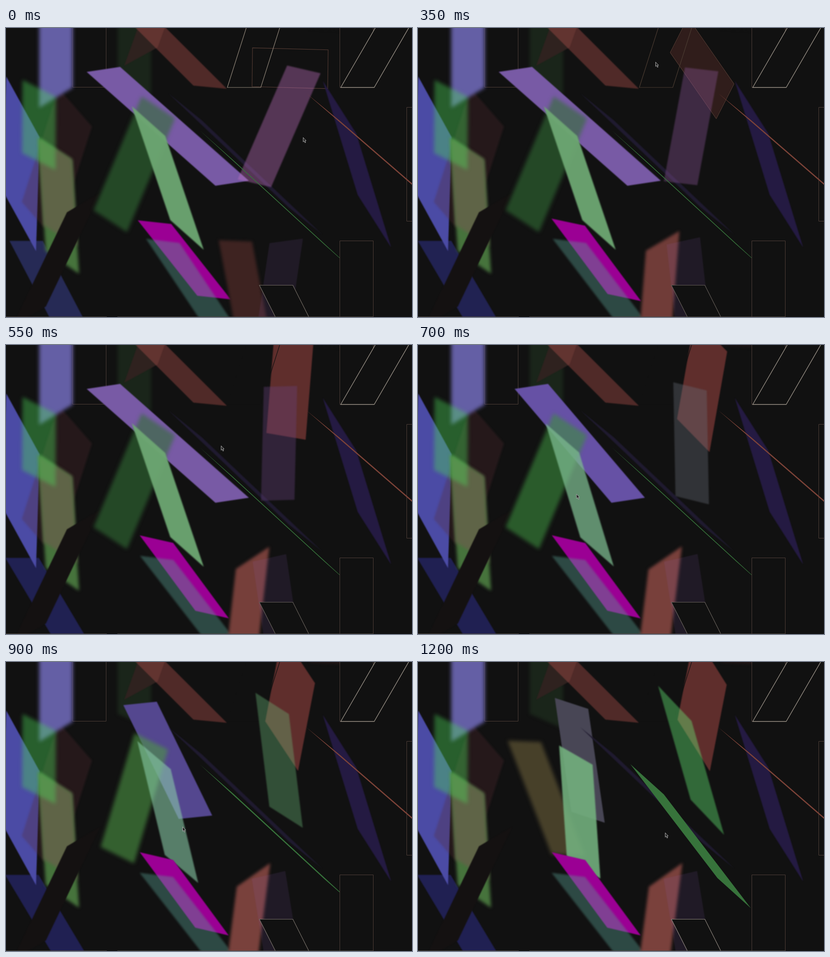
An HTML page with a canvas that plays this animation: 886x632 px, repeating every 1.25 s.

```html
<!DOCTYPE html>
<html lang="en">
<head>
<meta charset="utf-8">
<title>Drifting panels</title>
<style>
html, body { margin: 0; width: 100%; height: 100%; overflow: hidden; background: #111; }
canvas { display: block; }
</style>
</head>
<body>
<canvas id="stage" width="886" height="632"></canvas>
<script>
const ctx = document.getElementById('stage').getContext('2d');
const LOOP = 1250, STEP = 50;
const WIDTH = 73, HEIGHT = 249;
const BACK = [17, 17, 17];

const mix = (a, b, u) => Array.isArray(a) ? a.map((v, i) => mix(v, b[i], u)) : a + (b - a) * u;
const valueAt = (v, t) => typeof v === 'function' ? v(t) : v;
const rgb = c => `rgb(${c.map(Math.round)})`;
const logistic = (t, middle, spread) => 1 / (1 + Math.exp((middle - t) / spread));

// Motion that slows down towards its end value.
const settle = (from, to) => t => mix(from, to, 1 - Math.exp(-t / 195));

// Straight motion between a few key points, given as { time: value }.
function path(keys) {
  const times = Object.keys(keys).map(Number);
  return t => {
    const next = times.findIndex(time => time > t);
    if (next === 0) return keys[times[0]];
    if (next < 0) return keys[times[times.length - 1]];
    const a = times[next - 1], b = times[next];
    return mix(keys[a], keys[b], (t - a) / (b - a));
  };
}

// Parallelogram around a centre, spanned by two edge vectors.
function trace(x, y, [ux, uy], [vx, vy]) {
  ctx.beginPath();
  for (const [a, b] of [[-1, -1], [1, -1], [1, 1], [-1, 1]]) {
    ctx.lineTo(x + (a * ux + b * vx) / 2, y + (a * uy + b * vy) / 2);
  }
  ctx.closePath();
}

// tint is the colour as seen over the plain backdrop, whatever the opacity.
function paint(tint, alpha, blur) {
  ctx.save();
  if (blur) ctx.filter = `blur(${blur}px)`;
  ctx.globalAlpha = alpha;
  ctx.fillStyle = rgb(tint.map((c, i) => Math.min(255, Math.max(0, BACK[i] + (c - BACK[i]) / alpha))));
  ctx.fill();
  ctx.restore();
}

function line(colour, width) {
  ctx.strokeStyle = rgb(colour);
  ctx.lineWidth = width;
  ctx.stroke();
}

// dy: drop along the top edge; dx: shift along the side.
function panel(x, y, dy, dx, look) {
  const { tint, edge, alpha = 1, blur = 0.8, h = HEIGHT, width = 1.2 } = look;
  return t => {
    trace(x, y, [WIDTH, valueAt(dy, t)], [valueAt(dx, t), h]);
    if (tint) paint(valueAt(tint, t), valueAt(alpha, t), blur);
    if (edge) line(valueAt(edge, t), width);
  };
}

const box = (x, y) => panel(x, y, 0, 0, { tint: BACK, blur: 0, edge: [78, 62, 56], width: 1 });

// Turns from lying flat to standing, while filling with colour.
function spinner(t) {
  const polar = (length, degrees) => {
    const a = degrees * Math.PI / 180;
    return [length * Math.cos(a), length * Math.sin(a)];
  };
  const swell = 45 * Math.exp(-(((t - 600) / 180) ** 2));
  const top = polar(mix(85, 133, logistic(t, 740, 60)), mix(-90, 58, logistic(t, 485, 90)));
  const side = polar(mix(165, 193, logistic(t, 500, 90)) + swell, mix(0, 101, logistic(t, 335, 80)));
  const red = [95, 46, 44];
  trace(620, 88, top, side);
  if (t > 200) paint(path({ 200: BACK, 350: [48, 29, 27], 550: red })(t), 1, 0.8);
  if (t < 500) line(path({ 0: [85, 60, 52], 200: [125, 110, 95], 350: [80, 56, 48], 500: red })(t), 1.1);
}

function baseline() {
  ctx.fillStyle = rgb([75, 68, 63]);
  ctx.fillRect(0, 631, 220, 1);
  ctx.fillRect(243, 631, 558, 1);
}

const pointerPath = path({
  0: [648, 239], 350: [518, 74], 550: [469, 220], 800: [263, 396], 1050: [568, 306], 1200: [539, 373]
});

function pointer(t) {
  if (t > 100 && t < 300) return;
  ctx.save();
  ctx.translate(...pointerPath(t));
  ctx.fillStyle = '#222';
  ctx.strokeStyle = '#aaa';
  ctx.lineWidth = 1;
  const arrow = new Path2D('M.5 .5V10L2.8 8L4.4 12L6 11.3L4.5 7.5L7 7.3Z');
  ctx.fill(arrow);
  ctx.stroke(arrow);
  ctx.restore();
}

// Back to front.
const scene = [
  box(182, 5),
  panel(109, 590, 0, settle(130, 149), { tint: settle([38, 42, 85], [32, 32, 82]) }),
  panel(33, 297, 133, -8, { tint: [75, 75, 165] }),
  panel(111, 298, 84, -80, { tint: [38, 25, 27], alpha: 0.3, blur: 2 }),
  panel(109, 28, -44, 0, { tint: [100, 95, 165], blur: 4.5 }),
  panel(115, 388, 50, 16, { tint: [70, 115, 60], blur: 3.5 }),
  panel(113, 359, 46, 11, { tint: [95, 100, 71], blur: 3.5, h: 190 }),
  panel(72, 212, 37, -1, { tint: [40, 95, 45], alpha: 0.4, blur: 4, h: 160 }),
  panel(110, 506, -43, -119, { tint: [20, 17, 17] }),

  panel(280, 5, 32, 0, { tint: [26, 37, 26], blur: 3.5 }),
  panel(339, -62, -40, -89, { tint: [47, 34, 31], blur: 1.2 }),
  panel(321, 5, 7, 249, { tint: [80, 42, 40], alpha: 0.4, blur: 1.2 }),
  panel(353, 215,
    path({ 800: -11, 1050: -2, 1200: 24 }),
    path({ 550: 281, 800: 165, 1050: 55, 1200: 36 }),
    { tint: path({ 550: [120, 90, 165], 800: [90, 75, 165], 1050: [75, 65, 110], 1200: [72, 70, 85] }) }),
  panel(280, 298,
    path({ 800: 48, 1050: 18, 1200: 3 }),
    path({ 800: -105, 1050: -28, 1200: 96 }),
    { tint: path({ 550: [37, 73, 39], 800: [48, 105, 48], 1050: [62, 85, 48], 1200: [72, 65, 42] }),
      alpha: 0.6, blur: 4.5 }),
  panel(353, 328,
    path({ 550: 65, 1050: 60, 1200: 42 }),
    path({ 550: 84, 800: 70, 1050: 45, 1200: 17 }),
    { tint: path({ 550: [105, 160, 110], 800: [90, 130, 110], 1050: [85, 120, 100], 1200: [105, 160, 115] }),
      alpha: path({ 550: 0.95, 800: 0.6, 1050: 0.55, 1200: 0.9 }), blur: 1.8 }),
  panel(389, 507, settle(8, 17), settle(130, 121), { tint: [155, 0, 148], blur: 1.2, h: 165 }),
  panel(425, 590, 9, settle(166, 194), { tint: [45, 73, 68], alpha: 0.4, blur: 2.2 }),
  panel(524, 590, settle(3, -52), settle(47, -33), { tint: settle([62, 35, 33], [122, 65, 60]), blur: 3.2 }),
  panel(593, 590, settle(-10, -17), settle(-37, 41), { tint: [33, 27, 38], alpha: 0.12, blur: 1.2 }),
  panel(652, 687, 0, 125, {
    tint: BACK, blur: 0, edge: path({ 0: [115, 108, 100], 350: [98, 92, 86], 800: [105, 98, 92], 1050: [140, 132, 124] })
  }),

  panel(700, -122, 4, 0, { tint: path({ 550: BACK, 750: [34, 21, 21] }), blur: 3 }),
  spinner,
  panel(559, 5.5, 0, -79, { edge: path({ 200: [145, 135, 122], 350: [75, 60, 50], 500: BACK }) }),
  panel(522, 297, 59, 262, { tint: [31, 26, 47] }),
  panel(596, 215,
    path({ 0: 17, 200: 16, 550: -2, 800: 31, 1050: 70, 1200: 77 }),
    path({ 0: -108, 200: -92, 350: -46, 550: -6, 800: 12, 1050: 58, 1200: 71 }),
    { tint: path({ 0: [85, 55, 85], 550: [50, 36, 58], 800: [50, 62, 55], 1050: [51, 105, 58] }),
      alpha: 0.38, blur: 1.8 }),
  panel(766, 298, 115, 76, { tint: [36, 26, 66] }),
  panel(595, 381,
    path({ 800: 65, 1050: 63, 1200: 66 }),
    path({ 800: 271, 1050: 268, 1200: 190 }),
    { tint: [55, 115, 59], blur: 0.4 }),
  box(765, 5.5),
  panel(839, 5.5, 0, -144, { tint: BACK, blur: 0, edge: [150, 142, 132], width: 1.4 }),
  box(765, 590),
  box(911, 298),
  panel(835, 297, 60, 287, { tint: [125, 67, 56], blur: 0.5 }),
  baseline,
  pointer
];

function tick() {
  const t = Math.floor(performance.now() % LOOP / STEP) * STEP;
  ctx.fillStyle = rgb(BACK);
  ctx.fillRect(0, 0, 886, 632);
  scene.forEach(draw => draw(t));
  requestAnimationFrame(tick);
}
tick();
</script>
</body>
</html>
```
